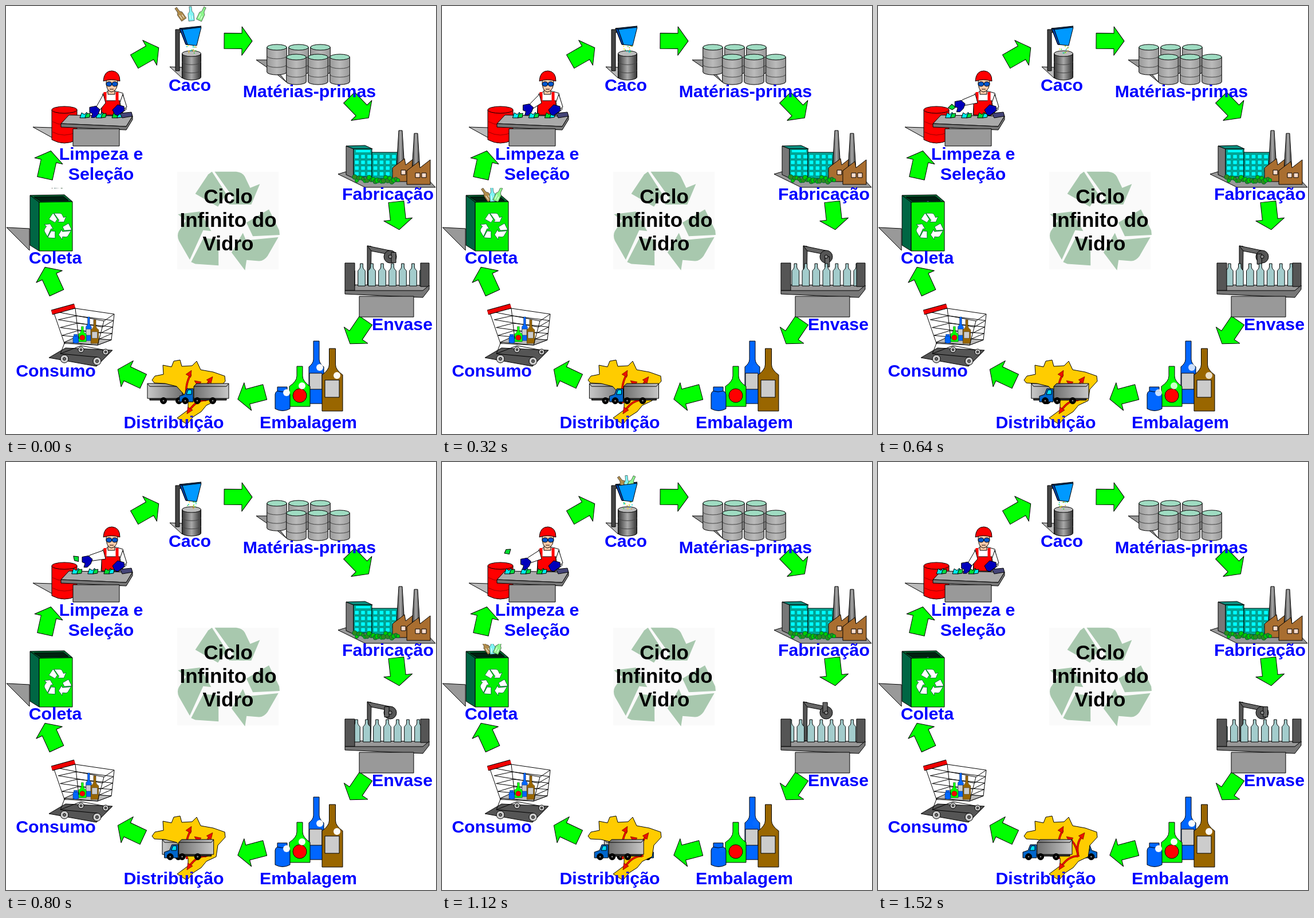
Animation, 751 px wide and 746 px high, one loop 1600 ms. Source, as an HTML page:

```html
<!DOCTYPE html>
<html lang="pt">
<head>
<meta charset="utf-8">
<title>Ciclo Infinito do Vidro</title>
<style>
html, body { margin: 0; width: 100%; height: 100%; overflow: hidden; background: #fff; }
svg { display: block; width: 100vw; height: 100vh; }
text { font: bold 30.3px "Liberation Sans", Arial, sans-serif; fill: #00f; text-anchor: middle; }
.title { font-size: 35px; fill: #000; }
</style>
</head>
<body>
<svg viewBox="0 0 751 746" stroke-linejoin="round">
  <defs>
    <linearGradient id="steel"><stop stop-color="#999"/><stop offset=".5" stop-color="#bbb"/><stop offset="1" stop-color="#999"/></linearGradient>
    <linearGradient id="dark"><stop stop-color="#333"/><stop offset=".5" stop-color="#aaa"/><stop offset="1" stop-color="#333"/></linearGradient>
    <linearGradient id="load"><stop stop-color="#707070"/><stop offset="1" stop-color="#c8c8c8"/></linearGradient>
    <clipPath id="belt"><path d="M609 440h115v60h-115Z"/></clipPath>
    <clipPath id="slot"><path d="M40 317h80v110h-80Z"/></clipPath>
  </defs>
  <g id="art"></g>
  <text x="321" y="148">Caco</text>
  <text x="530" y="159">Matérias-primas</text>
  <text x="667" y="338">Fabricação</text>
  <text x="692" y="565">Envase</text>
  <text x="528" y="736">Embalagem</text>
  <text x="293" y="736">Distribuição</text>
  <text x="87" y="646">Consumo</text>
  <text x="86" y="449">Coleta</text>
  <text x="166" y="268">Limpeza e</text>
  <text x="166" y="303">Seleção</text>
  <g class="title">
    <text class="title" x="388" y="344">Ciclo</text>
    <text class="title" x="388" y="385">Infinito do</text>
    <text class="title" x="388" y="426">Vidro</text>
  </g>
</svg>
<script>
const STEP = 80, COUNT = 20, DROP = 11;

const times = (n, f) => Array.from({ length: n }, (_, i) => f(i)).join('');
const path = (d, fill, stroke = '#000', w = 1) =>
  `<path d="${d}" fill="${fill}" stroke="${stroke}" stroke-width="${w}"/>`;
const poly = (pts, fill, stroke, w) => path(`M${pts}Z`, fill, stroke, w);
const line = (d, color, w) => path(d, 'none', color, w);
const rect = (x, y, w, h, fill, stroke, sw) => path(`M${x} ${y}h${w}v${h}h${-w}Z`, fill, stroke, sw);
const oval = (x, y, rx, ry, fill, stroke = '#000') =>
  `<ellipse cx="${x}" cy="${y}" rx="${rx}" ry="${ry}" fill="${fill}" stroke="${stroke}"/>`;
const dot = (x, y, r, fill, stroke) => oval(x, y, r, r, fill, stroke);
const group = (transform, body) => `<g transform="${transform}">${body}</g>`;
const place = (x, y, a, body, s = 1) => group(`translate(${x} ${y}) rotate(${a}) scale(${s})`, body);
const clip = (id, body) => `<g clip-path="url(#${id})">${body}</g>`;
const wheel = (x, y, r, fill, hub) => dot(x, y, r, fill) + dot(x, y, r * .35, hub);
const rand = n => { const v = Math.sin(n * 91.7) * 4375.5; return v - Math.floor(v); };
const wave = (k, shift = 0) => Math.cos(2 * Math.PI * (k - shift) / COUNT);

// w and n are half widths of the body and the neck, s is where the neck ends
const bottle = (x, t, b, w, n, s, fill, sw) => path(
  `M${x - n} ${t}h${2 * n}V${s}Q${x + n} ${s + w * .5} ${x + w} ${s + w}V${b}H${x - w}V${s + w}` +
  `Q${x - n} ${s + w * .5} ${x - n} ${s}Z`, fill, '#000', sw);

const drum = (x, t, b, rx, fill, top) => {
  const arc = y => `M${x - rx} ${y}a${rx} 5 0 0 0 ${2 * rx} 0`;
  return path(`${arc(b)}V${t}H${x - rx}Z`, fill) + oval(x, t, rx, 5, top) +
    line(arc(t + (b - t) * .35) + arc(t + (b - t) * .7), '#444');
};

const recycle = (x, y, s, fill, stroke, w) => place(x, y, 0, times(3, i => place(0, 0, i * 120,
  poly('-60-54-36-90-29-95-2-53-18-30', fill, stroke, w) +
  path('M-24-95H16Q27-94 32-86L42-65 60-72 44-34H2L11-46Z', fill, stroke, w))), s);

// arrows follow the ring, turned a little inwards
const arrow = ([x, y]) => place(x, y, Math.atan2(y - 372, x - 376) * 180 / Math.PI + 85,
  poly('-24-13.5 7-13.5 7-25 25 0 7 25 7 13.5-24 13.5', '#0f0'));
const arrows = [[245, 85], [405, 61], [616, 177], [684, 365], [615, 568],
  [429, 679], [218, 644], [78.5, 478], [73, 277]].map(arrow).join('');

const centre = rect(299, 289, 177, 170, '#fafafa', 'none') + recycle(387, 378, .94, '#a8c8ae', 'none', 0);

const drums = poly('437 94 458 94 490 133 472 118', '#999') +
  times(6, i => drum(473 + 38 * (i % 3) + (i > 2 ? 34 : 0), i > 2 ? 89 : 72, i > 2 ? 132 : 115, 17.3, 'url(#steel)', '#9fdcc2'));

const chimney = (x, y) => poly(`${x - 3} ${y}h6l4 65h-14`.replace(/^/, ''), 'url(#dark)');
const shed = (x, y) => poly(`${x} ${y}v-24l21-16 2 11 18-14v43`, '#a96e30') +
  rect(x + 15, y - 20, 8, 8, '#fdc') + rect(x + 26, y - 20, 8, 8, '#fdc');
const plant = poly('580 293 600 287 735 300 750 316 627 316', '#999') +
  poly('594 244 607 249 607 300 594 294', '#777') + poly('594 244 627 243 640 249 607 249', '#0a8f80') +
  rect(607, 249, 32, 49, '#00a896') + rect(611, 251, 25, 4, '#0ff', 'none') + rect(639, 255, 46, 46, '#00a896') +
  times(28, i => rect(609 + i % 7 * 10.8, 259 + Math.floor(i / 7) * 10, 7.5, 7, '#0ff', '#055', .5)) +
  chimney(689, 217) + shed(675, 306) + chimney(716, 222) + shed(700, 311) +
  times(22, i => dot(609 + i * 3.6, 298 + rand(i) * 8, 3 + rand(i + 40) * 1.5, i % 2 ? '#0c0' : '#2e8b1e', '#063'));

const packs = bottle(542, 584, 693, 13, 5, 616, '#06f') + rect(530, 640, 22, 28, '#ccc') +
  bottle(513, 628, 698, 18, 5, 645, '#0f0') + dot(513, 679, 12, '#f00') +
  bottle(570, 597, 706, 18, 5.5, 625, '#960') + rect(557, 652, 25, 30, '#ccc') +
  path('M474 664h17v7q5 2 5 6v25q-13 7-26 0v-25q0-4 4-6Z', '#06f') + line('M474 671q8 3 17 0');
const glints = [[490, 674], [517, 662], [548, 630], [578, 644]].map(([x, y]) => dot(x, y, 6, '#fff', 'none')).join('');

// wire rings shrink from the rim to the base
const hoop = f => line(`M${88 + 13 * f} ${533 + 55 * f}L${171 - 11 * f} ${549 + 42 * f} ${189 - 5 * f} ${537 + 45 * f} ` +
  `${121 + 6 * f} ${527 + 52 * f}Z`);
const cart = poly('75 613 104 596 186 600 158 628', '#555') + times(5, i => hoop(i / 4)) +
  poly('102 586 122 577 184 582 160 591', '#bbb') + group('translate(-61.6 320) scale(.38)', packs) +
  line('M83 533L102 588 95 606 159 612M171 549L160 591M189 537L184 582M121 527L127 580M95 606L131 592 174 600') +
  line('M80 534L120 523', '#000', 9) + line('M80 534L120 523', '#e00', 7) +
  times(4, i => wheel(131 - 29 * (i >> 1) + 43 * (i % 2) + 14 * (i >> 1) * (i % 2), 599 + 16 * (i >> 1) + 4 * (i % 2),
    5 + 2 * (i >> 1), '#ccc', '#777'));

const route = (d, x, y, a) => line(d, '#600', 3.5) + line(d, '#e10', 2.5) + place(x, y, a, poly('0 0 5 11-5 11', '#e10', '#600', .6));
const map = path('M255 652L260 645 275 642 274 626 289 629 293 619 304 617 307 628 325 627 333 619 340 634 362 638 ' +
  '382 645 383 654 370 668 367 688 350 696 341 707 327 716 316 729 299 718 318 704 318 691 309 675 298 663 278 658 259 657Z', '#fc0') +
  route('M316 692Q311 660 323 642', 324, 635, 30) + route('M350 688Q346 664 334 657', 329, 653, -55) +
  route('M350 688Q345 664 357 652', 361, 646, 38) + route('M350 687Q333 686 320 705', 316, 711, 212);

const fixed = arrows + centre + drums + plant + cart + packs;

const truck = (x, flip) => group(`translate(${x} 0) scale(${flip} 1)`,
  rect(14, 683, 68, 4, '#333') + poly('25 663 30 658 86 658 86 684 25 684', 'url(#load)') + line('M25 663H82L86 658') +
  poly('0 690 0 680 9 677 13 667 24 667 24 690', '#06c') + poly('12 677 15 669 21 669 21 677', '#0df') +
  [10, 31, 58].map(w => wheel(w, 688, 5.5, '#000', '#888')).join(''));

const trio = (x, y, spread, s) => ['#b08c4c', '#7ff4f4', '#8df58d'].map((c, i) =>
  place(x + (i - 1) * 19 * spread, y, (i - 1) * 30 - 5, bottle(0, -13, 12, 5, 2, -6, c, .5) + line('M-2 1v8M2 3v6', '#fff'), s)).join('');

function sorter(k) {
  const hx = 148.5 + 6.5 * wave(k), hy = 180 + 5.5 * wave(k), u = (k - 7) / 10;
  const shard = (i) => place(137 + 28 * i - 1.42 * k, 191, 0,
    poly('-8 4-5-5 0-2 4-6 7 2 1 4', i < 2 ? '#0ee' : '#0d3') + poly('1 4 3-3 10-4 9 3', i < 2 ? '#0d4' : '#0ee'));
  return poly('47 211 80 212 98 239', '#bbb') + path('M80 181V233Q102 245 124 233V181Z', '#f00') +
    oval(102, 181, 22, 6, '#f00') + line('M80 201q22 12 44 0M80 219q22 12 44 0', '#900') +
    path('M169 153Q184 144 204 152L210 180 198 190H166Z', '#fff') + rect(167, 165, 32, 25, '#f00') +
    line('M173 150V166M194 150V166', '#f00', 5) + rect(178, 146, 12, 8, '#fca') +
    path('M175 128Q174 148 184 150 196 148 195 128Z', '#fca') +
    path('M170 131Q171 113 185 113 199 114 199 131Q184 126 170 131Z', '#f00') +
    oval(180, 136, 5, 4, '#05c') + oval(190, 136, 5, 4, '#05c') + line('M181 145h7') +
    poly('96 205 110 190 221 192 210 210', '#aaa') + poly('96 205 210 210 221 192 221 198 210 216 96 211', '#777') +
    rect(117, 214, 81, 30, '#999') + times(3, shard) + poly('199 187 219 185 221 192 203 195', '#447') +
    path(`M170 154L${hx + 4} ${hy - 12} ${hx} ${hy - 3} ${hx + 7} ${hy - 2}L174 169Z`, '#fff') +
    poly('204 154 211 176 202 183 199 168', '#fff') + poly('186 181 195 172 206 175 207 182 195 191 190 189', '#00b') +
    place(hx, hy, 0, poly('-9-9 2-11 9-5 6 3 0 9-6 9-4 2-9 0', '#00b')) +
    (u >= 0 && u <= 1 ? place(138 - 28 * Math.sqrt(u), 178 - 135 * u * u * (1 - u) - 3 * u, k * 25, poly('-6 2-2-4 6-3 2 5', '#0d3')) : '');
}

function hopper(k, p) {
  const colors = ['#0cc', '#3c3', '#c93', '#fd0'];
  return poly('286 106 308 107 308 126', '#bbb') + path('M296 41H312V46H303V113H296Z', '#444') +
    drum(324, 83, 124, 16.5, 'url(#dark)', '#bbb') +
    times(14, i => dot(316 + rand(i + k) * 16, 69 + rand(i * 3 + k + 7) * 13, 1, colors[i % 4], 'none')) +
    poly('303 39 341 35 337 41 308 43', '#036') +
    (p < 4 ? trio(323, 14 + 7.5 * p, 1 - .2 * p, 1) : '') +
    poly('303 39 308 41 341 37 333 69 314 67', '#09f') + poly('303 39 308 41 317 67 314 67', '#04a');
}

const bin = p => poly('1 386 41 388 41 426', '#999') + poly('42 330 102 329 116 341 58 342', '#063') +
  poly('49 333 100 332 109 339 60 340', '#021') + clip('slot', trio(88, 305 + 6 * p, .55, 1)) +
  poly('42 330 58 342 58 427 42 417', '#064') + poly('58 342 116 341 116 427 58 427', '#00f000') +
  recycle(90, 385, .25, '#fff', '#053', 3);

const filler = k => poly('592 496 603 486 739 487 728 502', '#999') + poly('631 418 638 419 637 486 631 486', '#555') +
  poly('631 418 674 427 674 434 638 427', '#666') + dot(671, 437, 11, '#555') +
  rect(667 + 6 * wave(k), 428 + 9 * wave(k, 4.5), 8, 18, '#666') + dot(671, 437, 3, '#888') +
  clip('belt', times(8, i => bottle(603 - .9 * k + 18 * i, 449, 488, 6.3, 2.3, 455, '#a3cccc'))) +
  rect(592, 448, 17, 48, '#555') + rect(724, 448, 15, 41, '#555') +
  poly('592 496 728 496 739 487 739 494 728 508 592 502', '#777') + rect(617, 506, 95, 36, '#999');

const art = document.getElementById('art');
let shown = -1;

function draw(k) {
  const p = k % DROP;
  const glow = .5 + .5 * wave(2 * k + 1);
  art.innerHTML = fixed + `<g opacity="${glow}">${glints}</g>` + sorter(k) + hopper(k, p) + bin(p) + filler(k) +
    truck(333 + 2.6 * k, -1) + map + truck(303 - 2.63 * k, 1);
}

function tick() {
  const k = Math.floor(performance.now() / STEP) % COUNT;
  if (k !== shown) draw(shown = k);
  requestAnimationFrame(tick);
}
tick();
</script>
</body>
</html>
```
